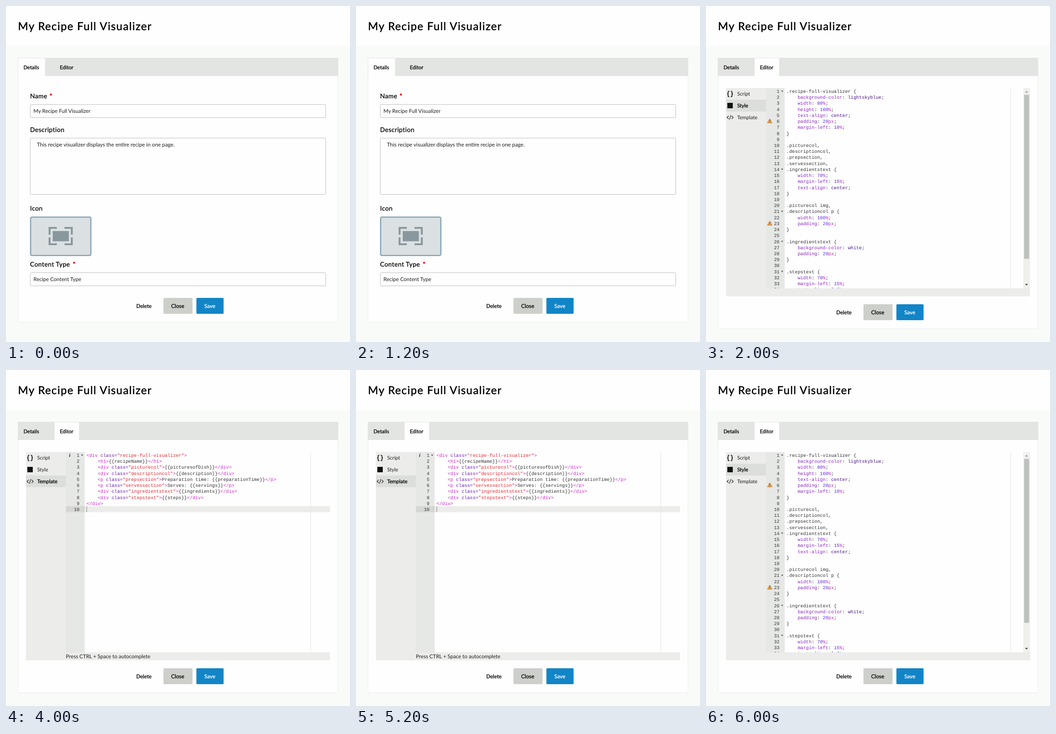
An HTML page that plays this animation: 758x739 px, repeating every 8 s.

```html
<!DOCTYPE html>
<html lang="en">
<head>
<meta charset="utf-8">
<title>Recipe visualizer settings</title>
<style>
html, body { margin: 0; width: 100%; height: 100%; overflow: hidden; background: #f9fbf9; }
svg { display: block; width: 758px; height: 739px; }
text { font-family: Lato, "Open Sans", sans-serif; fill: #1c1c1c; text-rendering: geometricPrecision; }
.med { fill: #000; stroke: #000; stroke-width: .3px; }
.label { font-size: 14px; letter-spacing: .45px; }
.code { font: 10.25px "Liberation Mono", monospace; fill: #333; }
</style>
</head>
<body>
<svg id="stage" viewBox="0 0 758 739"></svg>
<script>
const CHAR = 6.15, LINE = 13.22, TOP = 191;

const css = `.recipe-full-visualizer {
    background-color: lightskyblue;
    width: 80%;
    height: 100%;
    text-align: center;
    padding: 20px;
    margin-left: 10%;
}

.picturecol,
.descriptioncol,
.prepsection,
.servessection,
.ingredientstext {
    width: 70%;
    margin-left: 15%;
    text-align: center;
}

.picturecol img,
.descriptioncol p {
    width: 100%;
    padding: 20px;
}

.ingredientstext {
    background-color: white;
    padding: 20px;
}

.stepstext {
    width: 70%;
    margin-left: 15%;
    text-align: left;`.split("\n");

const html = `<div class="recipe-full-visualizer">
    <h1>{{recipeName}}</h1>
    <div class="picturecol">{{picturesofDish}}</div>
    <div class="descriptioncol">{{description}}</div>
    <p class="prepsection">Preparation time: {{preparationTime}}</p>
    <p class="servessection">Serves: {{servings}}</p>
    <div class="ingredientstext">{{ingredients}}</div>
    <div class="stepstext">{{steps}}</div>
</div>
`.split("\n");

const rect = (x, y, w, h, fill, extra = "") =>
  `<rect x="${x}" y="${y}" width="${w}" height="${h}" fill="${fill}" ${extra}/>`;
const path = (d, fill, extra = "") => `<path d="${d}" fill="${fill}" ${extra}/>`;
const text = (x, y, s, size, extra = "") =>
  `<text x="${x}" y="${y}" font-size="${size}" ${extra}>${s}</text>`;
const med = (x, y, s, size, extra = "") => text(x, y, s, size, `class="med" ${extra}`);
const label = (y, s) => `<text class="med label" x="53" y="${y}">${s}</text>`;
const star = (x, y) => `<text class="label" x="${x}" y="${y}" style="fill:#e8101c;stroke:#e8101c;stroke-width:.6px">*</text>`;
const field = (y, h) => rect(53.5, y + .5, 651, h, "#fefefe", 'rx="2" stroke="#bbbdbb"');
const span = (s, color) => `<tspan fill="${color}">${s}</tspan>`;
const escape = s => s.replace(/</g, "&lt;").replace(/>/g, "&gt;");

function colorCss(line) {
  const rule = line.match(/^([\w-]+): (.+);$/);
  if (!rule) return line;
  const value = /^\d/.test(rule[2])
    ? rule[2].replace(/(\d+)(.+)/, (m, n, unit) => span(n, "#5428e0") + span(unit, "#c41fb4"))
    : span(rule[2], "#4a1590");
  return `${span(rule[1], "#8a24c4")}: ${value};`;
}

const colorHtml = line => line.replace(/(<\/?\w+|>)|(class=)|"[^"]+"/g, (m, tag, attr) =>
  span(escape(m), tag ? "#cf25c8" : attr ? "#6a1cae" : "#e6262e"));

function codeLines(lines, color) {
  return lines.map((line, i) => {
    const y = TOP + i * LINE, body = line.trimStart();
    const x = 177.3 + (line.length - body.length) * CHAR;
    const fold = line.endsWith("{") || line.startsWith("<div")
      ? path(`M165.3 ${y - 5}h5l-2.5 3z`, "#555") : "";
    return `<text class="code" x="162" y="${y}" text-anchor="end">${i + 1}</text>${fold}` +
      `<text class="code" x="${x}" y="${y}">${color(body)}</text>`;
  }).join("");
}

const warning = y => path(`M140.5 ${y - 4.5}l5 9h-10z`, "#f2b25c", 'stroke="#a8692a" stroke-linejoin="round"') +
  path(`M140.5 ${y - 1.5}v3m0 1v1.2`, "none", 'stroke="#5a3510" stroke-width="1.1"');

function frame(bottom, tabX, tabW) {
  const y = bottom - 53.5, base = y + 21.5;
  return rect(26.5, 114.5, 705, bottom - 114.5, "#fefefe", 'rx="2" stroke="#e9ebe9"') +
    rect(26, 114, 706, 40, "#e3e5e2") + rect(tabX, 115, tabW, 39, "#fefefe") +
    med(38.7, 138.5, "Details", 11.2) + med(118.8, 138.5, "Editor", 11.2) +
    med(287, base, "Delete", 11.6) +
    rect(347, y, 64, 35, "#cdcfcb", 'rx="2"') + med(364, base, "Close", 11.8) +
    rect(419.5, y, 60, 35, "#1285c7", 'rx="2"') +
    med(437, base, "Save", 11.8, 'style="fill:#fff;stroke:#fff"');
}

function details() {
  const corner = "M96 503V488H112M129 488H145V503M145 509V524H129M112 524H96V509";
  return frame(695.5, 27, 59) +
    label(203, "Name") + star(96, 203) + field(216, 29) +
    text(60.5, 234.5, "My Recipe Full Visualizer", 11.6) +
    label(277, "Description") + field(290, 124) +
    text(68, 308.5, "This recipe visualizer displays the entire recipe in one page.", 11.8) +
    label(449.5, "Icon") +
    rect(54.2, 464.2, 132.8, 84.6, "#dbe0e2", 'rx="3" stroke="#86a4b5" stroke-width="2.6"') +
    rect(103, 495, 35.5, 22.5, "#89989d") +
    path(corner, "none", 'stroke="#89989d" stroke-width="4.2"') +
    label(573, "Content Type") + star(147, 573) + field(586, 29) +
    text(60.5, 604.5, "Recipe Content Type", 11.6);
}

function editor(selected, lines, color, under, over) {
  const menu = ["Script", "Style", "Template"].map((s, i) =>
    (i == selected ? med : text)(68.7, 197.2 + i * 25.7, s, 11.2)).join("");
  return frame(709.5, 107, 54) +
    rect(44, 180.5, 88, 458, "#ecedea") + rect(132, 621, 582, 17.5, "#ecedea") +
    rect(44, 180.5 + selected * 25.7, 88, 25.7, "#dcdedb") + menu +
    path("M51.5 187.5h-1q-1.8 0-1.8 1.8v2.2q0 2-2 2q2 0 2 2v2.2q0 1.8 1.8 1.8h1M54.5 187.5h1q1.8 0 1.8 1.8v2.2q0 2 2 2q-2 0-2 2v2.2q0 1.8-1.8 1.8h-1",
      "none", 'stroke="#111" stroke-width="1.7"') +
    rect(47, 213, 12, 12, "#111") +
    path("M50 241.5l-3.7 3.5 3.7 3.5M56.5 241.5l3.7 3.5-3.7 3.5M54.7 240l-3 10", "none", 'stroke="#222" stroke-width="1.2"') +
    rect(132, 180.5, 41.5, 440.5, "#e6e8e6") + under + rect(671, 180.5, 1, 440.5, "#e1e3e1") +
    `<g clip-path="url(#pane)">${codeLines(lines, color)}</g>` + over;
}

const scrollbar = rect(699, 180.5, 15, 440.5, "#eff0ee") + rect(701, 195.5, 11, 360.5, "#bfc1bf") +
  path("M703 190.2h6.6l-3.3-3.5z", "#999b99") + path("M703 611.2h6.6l-3.3 3.5z", "#444");

const style = editor(1, css, colorCss, "", scrollbar + warning(252.5) + warning(477.5));
const template = editor(2, html, colorHtml,
  rect(132, 299.5, 41.5, 13.2, "#d5d7d5") + rect(173.5, 299.5, 540.5, 13.2, "#ecedea"),
  rect(177.5, 300, 1, 12.5, "#888") +
  text(139, 190.5, "i", 11, `style="font:italic bold 11px 'Liberation Serif',serif"`) +
  text(132, 633.5, "Press CTRL + Space to autocomplete", 11.55));

const stage = document.getElementById("stage");
stage.innerHTML = `<clipPath id="pane">${rect(132, 180, 567, 441, "#000")}</clipPath>` +
  rect(0, 0, 758, 739, "#f9fbf9") + rect(0, 0, 758, 88, "#fefefe") +
  med(26.5, 53, "My Recipe Full Visualizer", 24, 'style="letter-spacing:1.4px;stroke-width:.5px"') +
  [details(), style, template].map(view => `<g class="view">${view}</g>`).join("");

const views = stage.querySelectorAll(".view"), order = [0, 1, 2, 1], start = performance.now();

function draw() {
  const t = Math.max(0, performance.now() - start) % 8000;
  const current = order[Math.floor(t / 2000)];
  views.forEach((view, i) => view.style.display = i == current ? "" : "none");
  requestAnimationFrame(draw);
}
draw();
</script>
</body>
</html>
```
